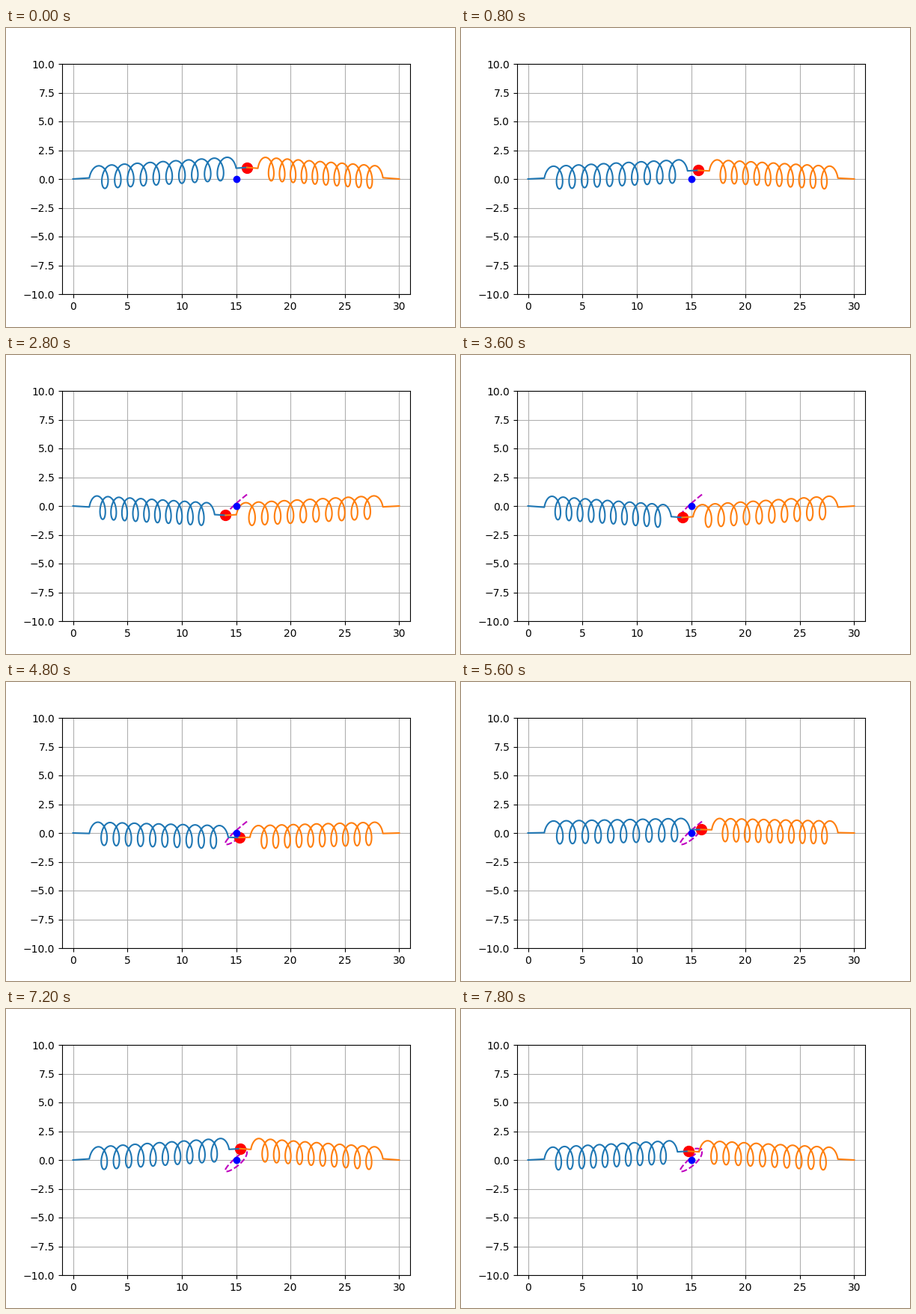
Write a matplotlib script that moves like this. It is 600 px wide and 400 px high and loops after 8 s.

```python
import numpy as np
import matplotlib.pyplot as plt
from matplotlib.animation import FuncAnimation

FRAMES, STEP_MS = 40, 200
WALL = 30.0
CENTER = WALL / 2
OMEGA_X, OMEGA_Y = 1.04, 0.896
TURNS, RADIUS = 10.5, 0.041   # radius is a share of the coil length
LEAD_WALL, LEAD_MASS = 1.5, 1.0

theta = np.linspace(0, 2 * np.pi * TURNS, 1000)
coil_x = (RADIUS * (1 - np.cos(theta))
          + (1 - 2 * RADIUS) * theta / theta[-1])
coil_y = np.sin(theta)


def mass_at(t):
    return CENTER + np.cos(OMEGA_X * t), np.cos(OMEGA_Y * t)


def spring(length, height):
    """Coil from the origin to (length, height) with straight ends."""
    coil = LEAD_WALL + (length - LEAD_WALL - LEAD_MASS) * coil_x
    x = np.concatenate(([0], coil, [length]))
    y = np.concatenate(([0], coil_y, [0])) + height * x / length
    return x, y


fig, ax = plt.subplots(figsize=(6, 4), dpi=100)
ax.set_xlim(-1, 31)
ax.set_ylim(-10, 10)
ax.grid(True)

trail, = ax.plot([], [], 'm--')
mass, = ax.plot([], [], 'ro', markersize=10)
left, = ax.plot([], [], color='C0')
right, = ax.plot([], [], color='C1')
ax.plot([CENTER], [0], 'bo')


def update(i):
    times = np.arange(i + 1) * STEP_MS / 1000
    xs, ys = mass_at(times)
    x, y = xs[-1], ys[-1]
    trail.set_data(xs, ys)
    mass.set_data([x], [y])
    left.set_data(*spring(x, y))
    sx, sy = spring(WALL - x, y)
    right.set_data(WALL - sx, sy)
    return trail, mass, left, right


anim = FuncAnimation(fig, update, frames=FRAMES, interval=STEP_MS,
                     repeat=True, repeat_delay=0)
plt.show()
```
